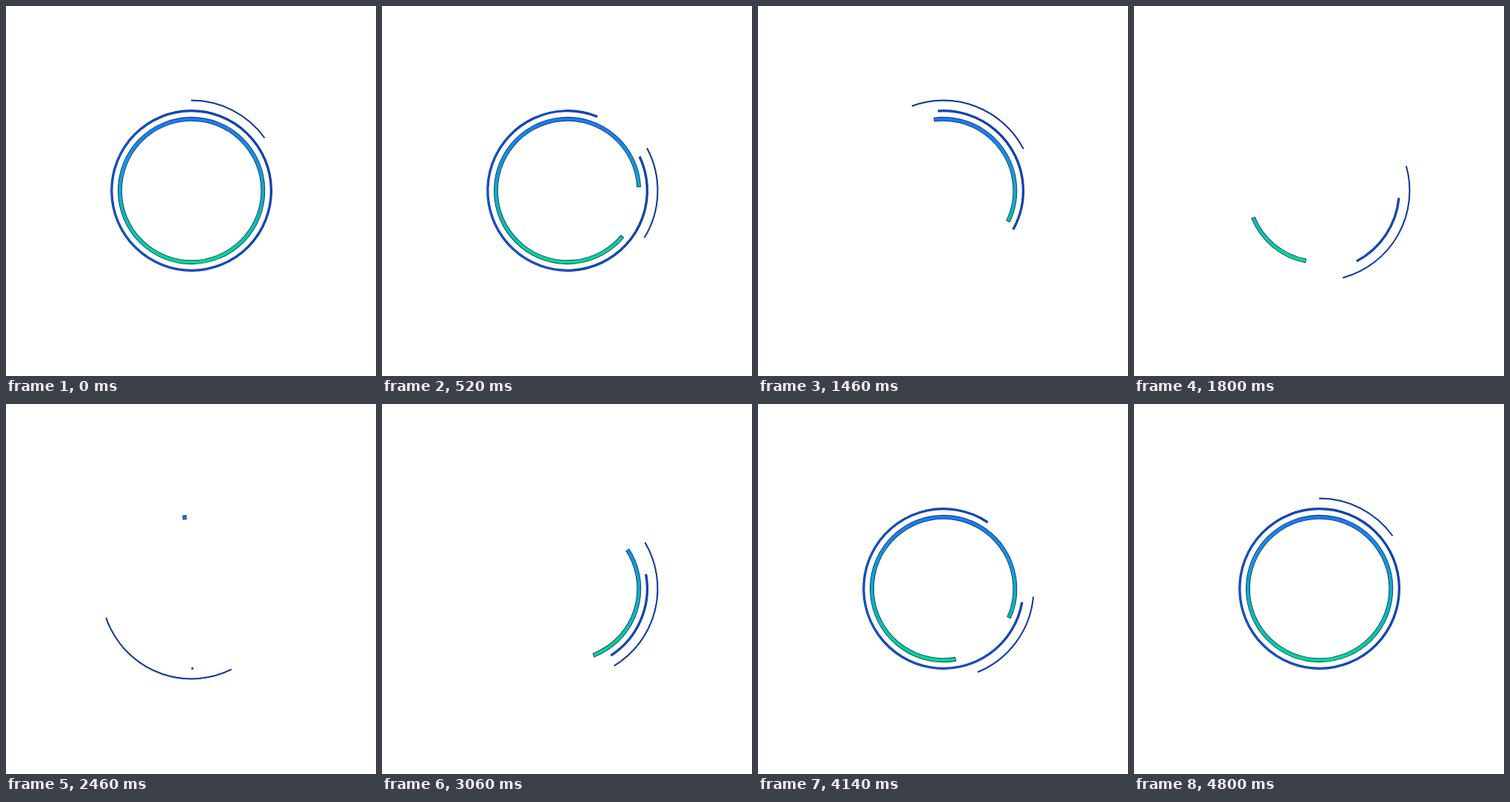
Recreate the animation shown at these times as an HTML page with a canvas. Size 500 by 500 pixels, loop 4840 ms.

```html
<!DOCTYPE html>
<html lang="en">
<head>
<meta charset="utf-8">
<title>Spinning rings</title>
<style>
  html, body { margin: 0; width: 100%; height: 100%; overflow: hidden; background: #fff; }
  canvas { display: block; }
</style>
</head>
<body>
<canvas id="stage" width="500" height="500"></canvas>
<script>
const ctx = document.getElementById('stage').getContext('2d');
const CX = 250.6, CY = 249.5;
const LOOP = 4840, HALF = 2400, STEP = 20;

function gradient(x0, y0, x1, y1, from, to) {
  const g = ctx.createLinearGradient(x0, y0, x1, y1);
  g.addColorStop(0, from);
  g.addColorStop(1, to);
  return g;
}

// from/to: [start, end] angles in degrees, clockwise from the top
const rings = [
  { radius: 96.7, width: 4.3, edge: 0.8, from: [0, 360], to: [1080, 1080], back: 0.167,
    fill: gradient(0, 150, 0, 349, '#1b76ff', '#06d897'), rim: '#0c3550' },
  { radius: 107.8, width: 1.9, edge: 0.65, from: [0, 360], to: [540, 540], back: 1 / 3,
    fill: gradient(150, 310, 350, 190, '#0c5ae8', '#0648cc'), rim: '#08296e' },
  { radius: 121.9, width: 1.1, edge: 0.45, from: [0, 54], to: [514.8, 612], back: 1 / 3,
    fill: '#0a46b4', rim: '#0a2c70' }
];

// cubic-bezier(x1, 0, 2/3, 1)
function ease(x, x1) {
  let lo = 0, hi = 1, u = x;
  for (let i = 0; i < 30; i++) {
    u = (lo + hi) / 2;
    const v = 1 - u;
    if (3 * v * v * u * x1 + 2 * v * u * u + u * u * u < x) lo = u;
    else hi = u;
  }
  return u * u * (3 - 2 * u);
}

function arc(ring, start, end, width, color) {
  ctx.beginPath();
  ctx.arc(CX, CY, ring.radius, start, end);
  ctx.lineWidth = width;
  ctx.strokeStyle = color;
  ctx.stroke();
}

function drawRing(ring, t) {
  const k = t < HALF ? ease(t / HALF, 1 / 3) : 1 - ease((t - HALF) / HALF, ring.back);
  const [start, end] = ring.from.map((a, i) => (a + (ring.to[i] - a) * k - 90) * Math.PI / 180);
  if (end - start < 0.001) return;
  const pad = ring.edge / ring.radius;
  arc(ring, start - pad, end + pad, ring.width + 2 * ring.edge, ring.rim);
  arc(ring, start, end, ring.width, ring.fill);
}

const began = performance.now();

function frame() {
  const elapsed = (performance.now() - began) % LOOP;
  const t = Math.min(Math.floor(elapsed / STEP) * STEP, 2 * HALF);
  ctx.clearRect(0, 0, 500, 500);
  rings.forEach(ring => drawRing(ring, t));
  requestAnimationFrame(frame);
}
frame();
</script>
</body>
</html>
```
